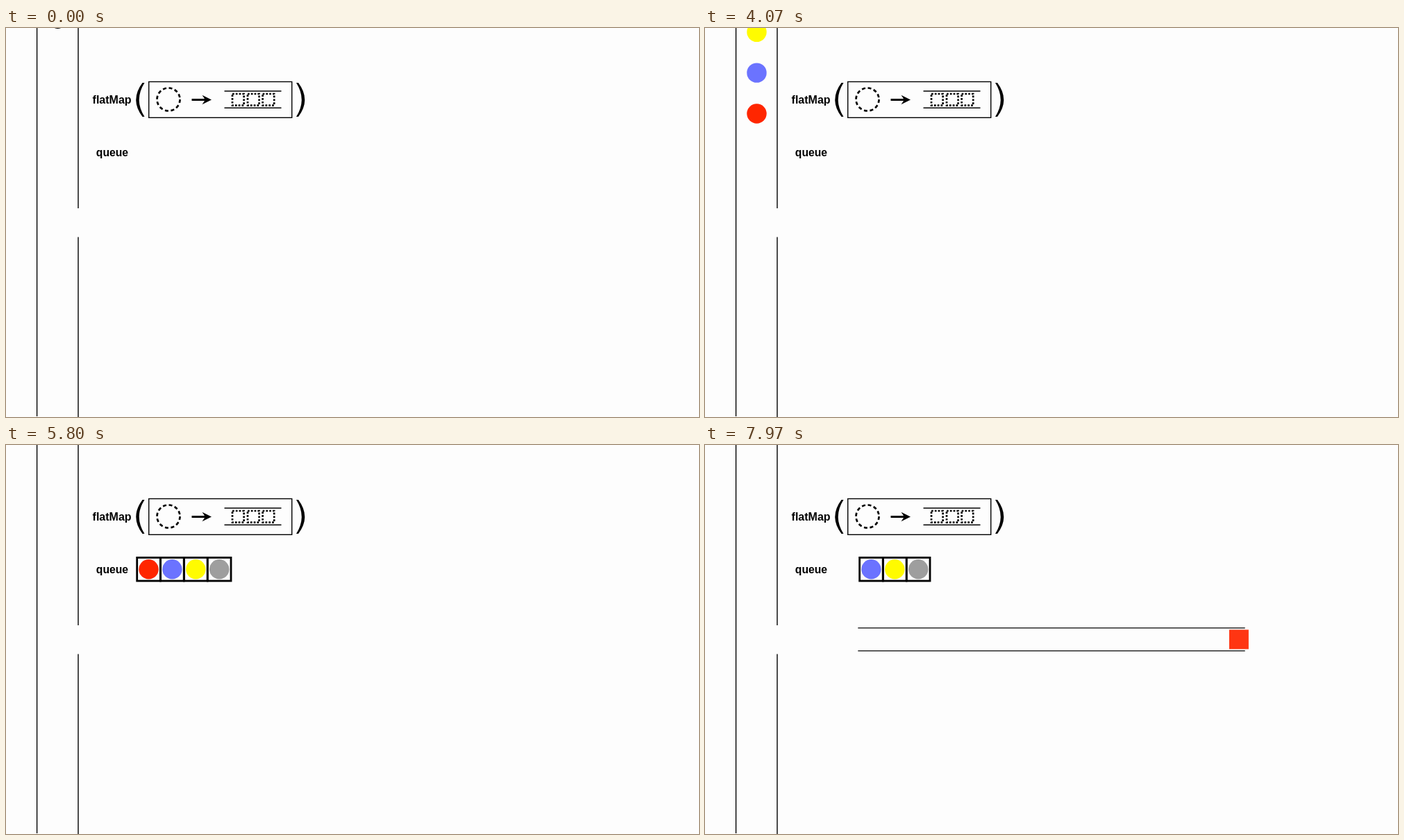
Write an HTML page that moves like this. It is 998 by 561 pixels and loops after 8000 ms.

```html
<!DOCTYPE html>
<html lang="en">
<head>
<meta charset="utf-8">
<title>flatMap</title>
<style>
  html, body { margin: 0; width: 100%; height: 100%; overflow: hidden; background: #fdfdfd; }
  svg { display: block; width: 100vw; height: 100vh; }
  text { font: bold 16px "Liberation Sans", Arial, sans-serif; }
  .mid { text-anchor: middle; }
  .line { fill: none; stroke: #000; stroke-width: 1.4; }
</style>
</head>
<body>
<svg viewBox="0 0 998 561">
  <path id="label" class="line" d="M70.5 -.5Q74.5 1 78.5 -.5"/>
  <path class="line" d="M44.6 0V560M104 0V260M104 301.5V561"/>

  <text x="124.6" y="109">flatMap</text>
  <text x="129.8" y="185" style="font-size:15.7px">queue</text>
  <path id="paren" d="M196.5 79H199.5Q184 103.5 199.5 128H196.5Q178 103.5 196.5 79Z"/>
  <use href="#paren" transform="translate(617.5 0) scale(-1 1)"/>
  <rect class="line" x="205.7" y="77.5" width="206" height="51.8"/>
  <circle cx="234" cy="103" r="16.5" fill="none" stroke="#000" stroke-width="2.7" stroke-dasharray="5 3.64"/>
  <path d="M267.5 102H286L282.5 96.7L296 103.5L282.5 110.2L286 105H267.5Z"/>
  <path class="line" d="M314.5 91H396.5M314.5 115.2H396.5"/>
  <g fill="none" stroke="#000" stroke-width="2.7" stroke-dasharray="2.7 2.1">
    <rect x="326" y="95" width="16.6" height="16.6"/>
    <rect x="348" y="95" width="16.6" height="16.6"/>
    <rect x="369.6" y="95" width="16.6" height="16.6"/>
  </g>

  <g id="tube"><path class="line" d="M-278.7 -16.5H278.7M-278.7 16.5H278.7"/></g>
  <g id="items"></g>
  <rect id="result" x="-14" y="-14" width="28" height="28" fill="#ff2600"/>
  <g id="request" fill="#0433dc">
    <path d="M-22.5 0H18" stroke="#0433dc" stroke-width="1.3"/>
    <path d="M22.5 0L17 -2.7V2.7Z"/>
    <text class="mid" y="-4.5" style="font-size:9.4px">request</text>
    <text class="mid" transform="translate(0 14.2) rotate(90)" y="5.7">4</text>
  </g>
</svg>
<script>
const LOOP = 8000;
const OPENING = 280.6, GAP = 58.8;
const ARRIVE = 4590, STEP = 205;
const colors = ['#ff2600', '#6b73ff', '#fffb00', '#9e9e9e'];

const $ = id => document.getElementById(id);
const lerp = (a, b, p) => a + (b - a) * p;
const clamp = v => Math.min(1, Math.max(0, v));
const ease = (t, start, dur) => (1 - Math.cos(Math.PI * clamp((t - start) / dur))) / 2;

function add(parent, tag, attrs) {
  const el = document.createElementNS('http://www.w3.org/2000/svg', tag);
  for (const k in attrs) el.setAttribute(k, attrs[k]);
  return parent.appendChild(el);
}

function place(el, x, y, opacity = 1, extra = '') {
  el.setAttribute('transform', `translate(${x} ${y}) ${extra}`);
  el.setAttribute('opacity', opacity);
}

const dot = (parent, fill) => add(parent, 'circle', { r: 14.2, fill });

const items = colors.map(color => {
  const cell = add($('items'), 'g', {});
  add(cell, 'rect', { x: -16.8, y: -16.8, width: 33.6, height: 33.6, fill: '#fdfdfd', stroke: '#000', 'stroke-width': 2.8 });
  dot(cell, color);
  return { ball: dot($('items'), color), cell };
});

function drawRequest(t) {
  const el = $('request');
  if (t < 5000) {
    const y = 583.5 - 344 * (ease(t, 975, 1280) + ease(t, 2522, 1280));
    place(el, 72.3, y, 1, 'rotate(-90)');
  } else {
    const x = lerp(156.5, 807.5, ease(t, 6809, 1000));
    place(el, x, 278.5, t < 7809 ? ease(t, 5870, 620) : 0);
  }
}

function drawItems(t) {
  // The column slides in, then advances one place per queued item.
  let shift = lerp(-16, OPENING, ease(t, 3590, 1000));
  for (let k = 0; k < 3; k++) shift += GAP * ease(t, ARRIVE + k * STEP, STEP);
  const out = ease(t, 5870, 670);
  items.forEach(({ ball, cell }, i) => {
    const queued = ease(t, ARRIVE + i * STEP, STEP);
    place(ball, 74.5, Math.min(OPENING, shift - i * GAP), 1 - queued);
    const leave = i ? 0 : out;
    place(cell, 205.5 + 33.9 * i, 179.2 + 143 * leave, queued * (1 - leave));
  });
  place($('tube'), 499, 280.4, out, `scale(${lerp(0.88, 1, out)} 1)`);
}

function draw(t) {
  $('label').setAttribute('opacity', t < 4200 ? 1 : 0);
  drawRequest(t);
  drawItems(t);
  place($('result'), lerp(807, 205.5, ease(t, 7809, 1000)), 280.4, 0.93 * clamp((t - 7809) / 100));
}

const begin = performance.now();
function tick() {
  draw((performance.now() - begin) % LOOP);
  requestAnimationFrame(tick);
}
tick();
</script>
</body>
</html>
```
